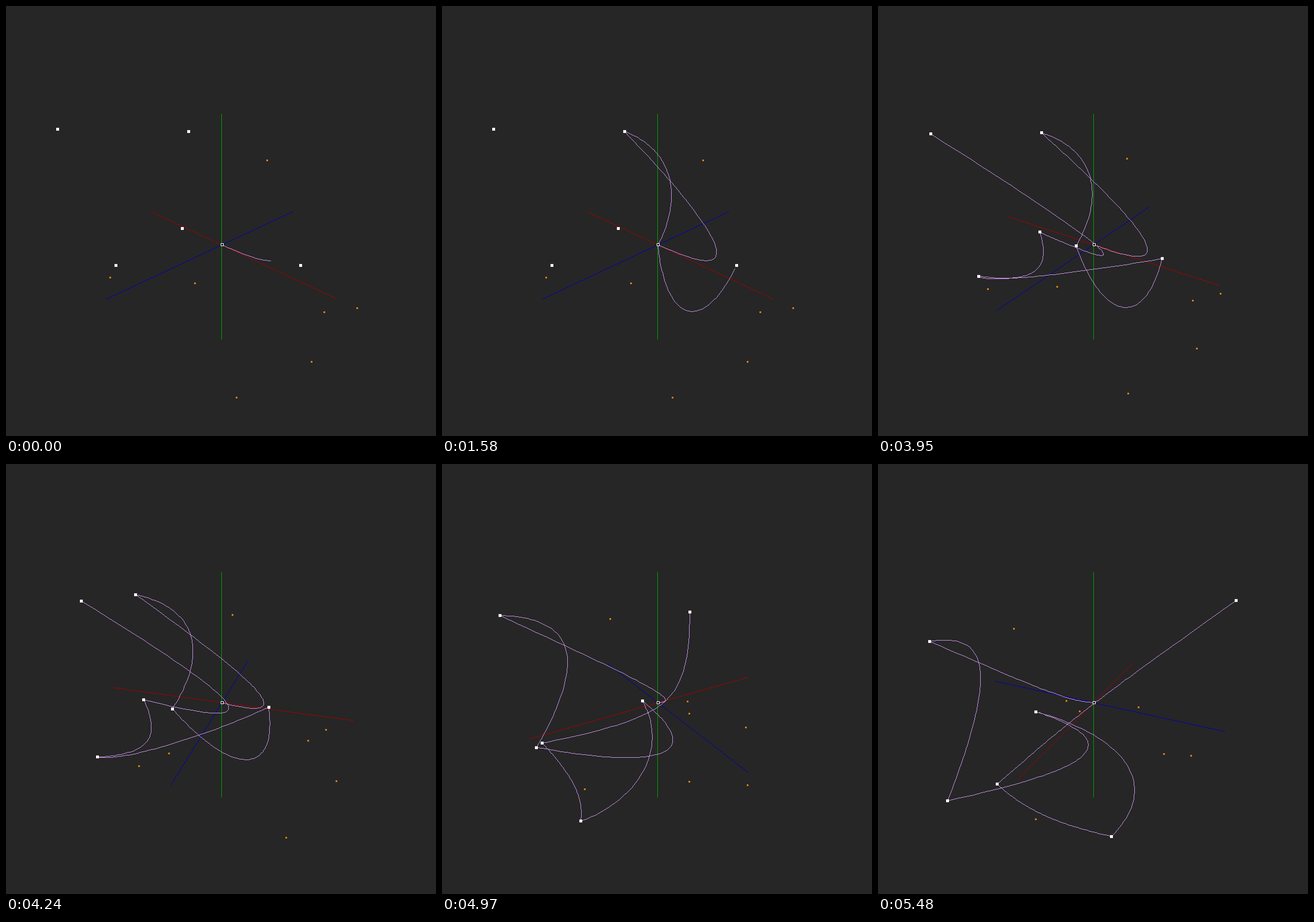
Animation of 745 by 745 pixels, one loop 5640 ms. Source, as an HTML page with a canvas:

```html
<!DOCTYPE html>
<html lang="en">
<head>
<meta charset="utf-8">
<title>Curve path in space</title>
<style>
html, body { margin: 0; width: 100%; height: 100%; overflow: hidden; background: #262626; }
canvas { display: block; }
</style>
</head>
<body>
<canvas id="stage" width="745" height="745"></canvas>
<script>
const SIZE = 745, LOOP = 5640, STEP = 10;
const ctx = document.getElementById('stage').getContext('2d');

// Camera: pixels per axis length, principal point, height, pitch and distance.
const SCALE = 214.6, CX = 374, CY = 386, LIFT = 27.5;
const PITCH = 25.2 * Math.PI / 180, DISTANCE = 2.676;

// Key points of the path, where each quadratic piece starts, bends and ends.
const start = [0, 0, 0];
const bends = [
  [.879, -.575, -.767], [-.090, .558, -.653], [.630, -.779, .486],
  [-.292, -.062, .832], [-.616, -.777, -.211], [.712, -.563, -.504]
];
const ends = [
  [-.977, .724, -.507], [-.855, -.643, -.855], [.281, -.415, -.786],
  [-.862, -.346, .515], [-.881, -.244, -.286], [-.417, .957, .938]
];
const looseBend = [.948, -.492, .100];

// The view rests, is nudged once, then orbits with a slight acceleration.
function yawAt(time) {
  if (time < 3620) return 45;
  if (time < 3870) return 43.7;
  const elapsed = Math.min(time, 5480) - 3950;
  return 34.7 - 0.0636 * elapsed - 1e-6 * elapsed ** 2;
}

function makeProjector(yaw) {
  const angle = yaw * Math.PI / 180;
  const c = Math.cos(angle), s = Math.sin(angle);
  const pitchCos = Math.cos(PITCH), pitchSin = Math.sin(PITCH);
  return ([x, y, z]) => {
    const right = x * c - z * s, toward = x * s + z * c;
    const depth = 1 - (pitchCos * toward + pitchSin * y) / DISTANCE;
    const down = LIFT + SCALE * (pitchSin * toward - pitchCos * y);
    return [Math.floor(CX + SCALE * right / depth), Math.floor(CY + down / depth)];
  };
}

// Hard one-pixel line without antialiasing.
function line([x0, y0], [x1, y1], color) {
  ctx.fillStyle = color;
  const n = Math.max(Math.abs(x1 - x0), Math.abs(y1 - y0), 1);
  for (let i = 0; i <= n; i++) {
    ctx.fillRect(Math.round(x0 + (x1 - x0) * i / n), Math.round(y0 + (y1 - y0) * i / n), 1, 1);
  }
}

function square([x, y], size, color) {
  const half = (size - 1) / 2;
  ctx.fillStyle = color;
  ctx.fillRect(x - half, y - half, size, size);
}

function bezier(a, b, c, t) {
  const u = 1 - t;
  return a.map((v, i) => u * u * v + 2 * u * t * b[i] + t * t * c[i]);
}

function drawAxes(project) {
  ['#a00000', '#00a000', '#0000b0'].forEach((color, axis) => {
    const tip = sign => project(start.map((_, i) => i === axis ? sign : 0));
    const [from, to] = [tip(-1), tip(1)];
    // The upright axis sits on the pixel column left of the centre.
    if (axis === 1) from[0] = to[0] = CX - 1;
    line(from, to, color);
  });
}

function drawPath(project, progress) {
  const samples = 60;
  bends.forEach((bend, i) => {
    const from = i ? ends[i - 1] : start;
    const drawn = Math.min(1, progress - i);
    const count = Math.ceil(samples * drawn);
    let last = project(from);
    for (let k = 1; k <= count; k++) {
      const next = project(bezier(from, bend, ends[i], drawn * k / count));
      line(last, next, '#bd8cdc');
      last = next;
    }
  });
}

function draw(time) {
  const project = makeProjector(yawAt(time));
  ctx.fillStyle = '#262626';
  ctx.fillRect(0, 0, SIZE, SIZE);
  drawAxes(project);
  drawPath(project, 0.245 + time / 577);
  [...bends, looseBend].forEach(p => square(project(p), 3, '#d8800f'));
  [...ends, start].forEach(p => square(project(p), 5, '#fff'));
  square(project(start), 3, '#000');
}

const began = performance.now();
function tick() {
  const time = (performance.now() - began) % LOOP;
  draw(Math.floor(time / STEP) * STEP);
  requestAnimationFrame(tick);
}
tick();
</script>
</body>
</html>
```
